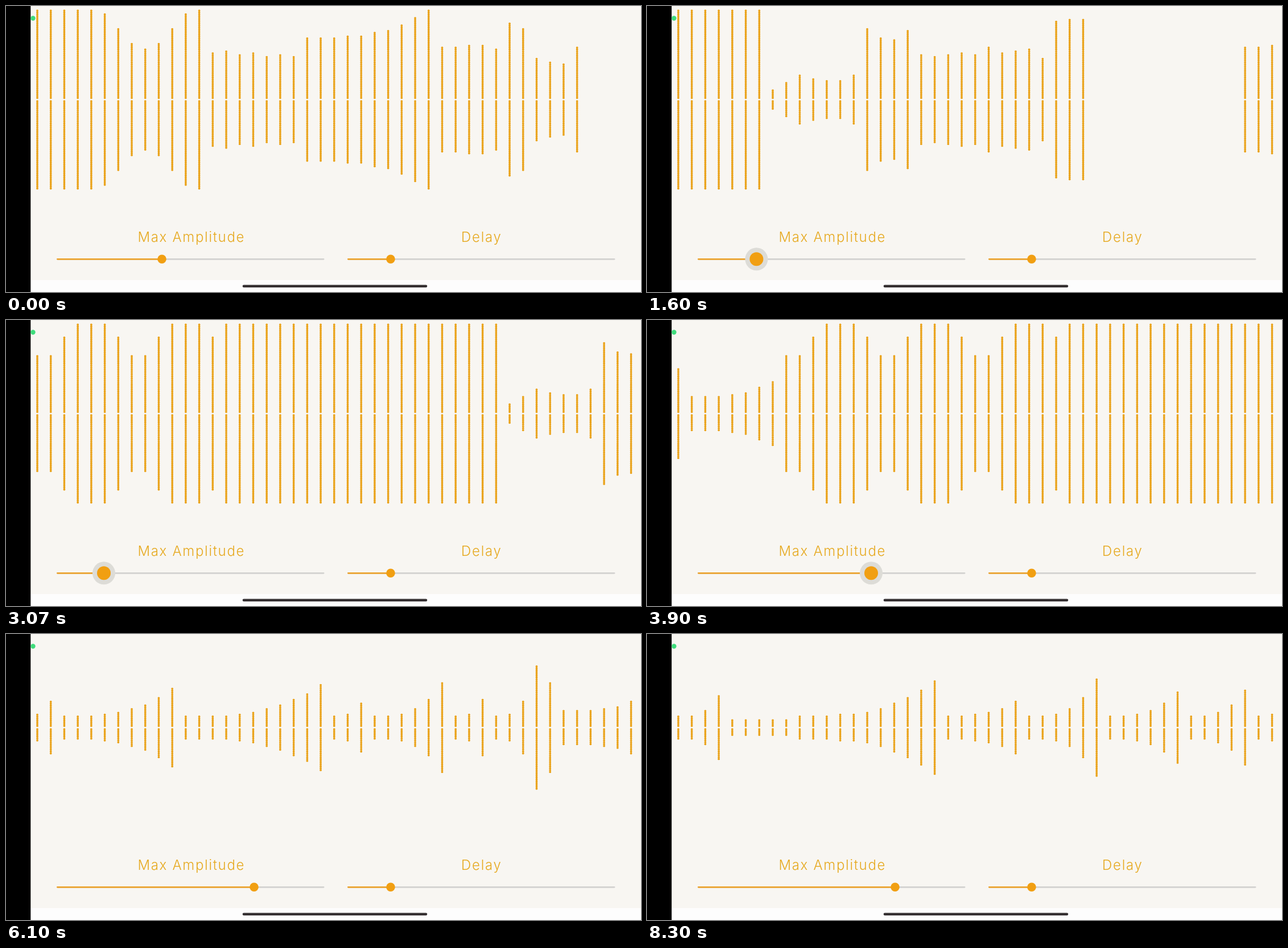
Write an HTML page that moves like this. It is 1116 px wide and 502 px high and loops after 8330 ms.

```html
<!DOCTYPE html>
<html lang="en">
<head>
<meta charset="utf-8">
<title>Audio wave</title>
<style>
  html, body { margin: 0; width: 100%; height: 100%; overflow: hidden; background: #f8f6f2; }
  svg { display: block; }
  text { font: 300 24px Inter, sans-serif; letter-spacing: 1.7px; text-anchor: middle; fill: #e6a91f; }
  path { fill: none; stroke-linecap: round; }
  .track { stroke: #d3d2d0; stroke-width: 2.8; }
  .level { stroke: #eca430; stroke-width: 2.8; }
  .thumb { fill: #f19f12; }
</style>
</head>
<body>
<svg width="1116" height="502" viewBox="0 0 1116 502">
  <rect y="481" width="1116" height="21" fill="#fdfdfd"/>
  <rect width="43.3" height="502"/>
  <circle cx="47.5" cy="21.5" r="4.2" fill="#3fdc7c"/>
  <path id="wave" stroke="#eaa31b" stroke-width="3.9" stroke-dasharray="0 3.255"/>

  <text x="325.8" y="413.5">Max Amplitude</text>
  <path class="track" d="M90.5 444.3H558"/>
  <path class="level" id="level"/>
  <circle id="halo" cy="444.3" r="20" fill="#dddcd7"/>
  <circle class="thumb" id="thumb" cy="444.3"/>

  <text x="835.8" y="413.5">Delay</text>
  <path class="track" d="M601.5 444.3H1069"/>
  <path class="level" d="M601.5 444.3H676"/>
  <circle class="thumb" cx="676" cy="444.3" r="7.8"/>

  <path d="M418 491.7H738" stroke="#353032" stroke-width="4.6"/>
</svg>
<script>
const LOOP = 8330, FULL = 48, STEP = 3.255, SLOTS = 45;
const [wave, level, halo, thumb] = ['wave', 'level', 'halo', 'thumb'].map(id => document.getElementById(id));

let seed = 7;
const random = () => (seed = seed * 16807 % 2147483647) / 2147483647;

// Bar heights in dots, newest first, built from short passages of sound.
const bars = [];
function passage(n, height) {
  for (let i = 0; i < n; i++) bars.push(Math.min(FULL, Math.round(height(i))));
}
const hold = (n, mid, spread = 0) => passage(n, () => mid + spread * (2 * random() - 1));
const ramp = (n, from, to) => passage(n, i => from + (to - from) * (i / (n - 1)) ** 3);
const swell = (n, mid, swing, period, peak) =>
  passage(n, i => mid + swing * Math.cos(2 * Math.PI * (i - peak) / period));

// Quiet speech: each syllable [bars, peak] grows out of a murmur.
const syllables = [[4, 17], [5, 4], [11, 25], [6, 14], [6, 26], [6, 19], [5, 20],
  [3, 14], [9, 21], [11, 23], [3, 13], [6, 24], [3, 15], [4, 33]];
for (const [n, peak] of syllables) ramp(n, Math.min(peak, 6), peak);
hold(1, 24);
ramp(7, 9, 17);

// Loud passage, clipped at full height
swell(21, 44, 14, 7, 4);
hold(21, FULL);

// Soft start, then normal speech
hold(7, 9, 5);
hold(4, 34, 5);
hold(10, 25, 3);
hold(3, 43, 3);

// Silence and what came before it
hold(11, 0);
hold(7, 29, 2);
hold(7, FULL);
swell(9, 38, 11, 8, 0);
hold(7, 24, 2);
ramp(10, 33, FULL);
hold(5, 28, 1);
hold(2, 40, 2);
hold(4, 23, 5);

// [time, index of the newest visible bar] and [time, thumb x]
const OPENING = 177;
const scroll = [[30, 156], [870, 139], [2300, 111], [3900, 82], [5270, 61], [6970, 26], [8300, 0]];
const drag = [[1200, 274], [1700, 172], [3250, 172], [3900, 394], [4500, 436]];

function at(keys, t) {
  if (t <= keys[0][0]) return keys[0][1];
  for (let i = 1; i < keys.length; i++) {
    const [t0, a] = keys[i - 1], [t1, b] = keys[i];
    if (t < t1) return a + (b - a) * (t - t0) / (t1 - t0);
  }
  return keys.at(-1)[1];
}

function draw(t) {
  const first = t < 30 ? OPENING : Math.round(at(scroll, t));
  let d = '';
  for (let i = 0; i < SLOTS; i++) {
    const n = bars[first + i];
    if (!n) continue;
    const x = 55 + i * 23.717, h = (n - 1) * STEP + 0.1;
    d += `M${x} 161.2v${-h}M${x} 167.3v${h}`;
  }
  wave.setAttribute('d', d);

  const x = at(drag, t), held = t > 1150 && t < 4900;
  level.setAttribute('d', `M90.5 444.3H${x}`);
  halo.setAttribute('cx', x);
  halo.setAttribute('visibility', held ? 'visible' : 'hidden');
  thumb.setAttribute('cx', x);
  thumb.setAttribute('r', held ? 12 : 7.8);
}

let start;
function tick(now) {
  start ??= now;
  draw((now - start) % LOOP);
  requestAnimationFrame(tick);
}
draw(0);
requestAnimationFrame(tick);
</script>
</body>
</html>
```
